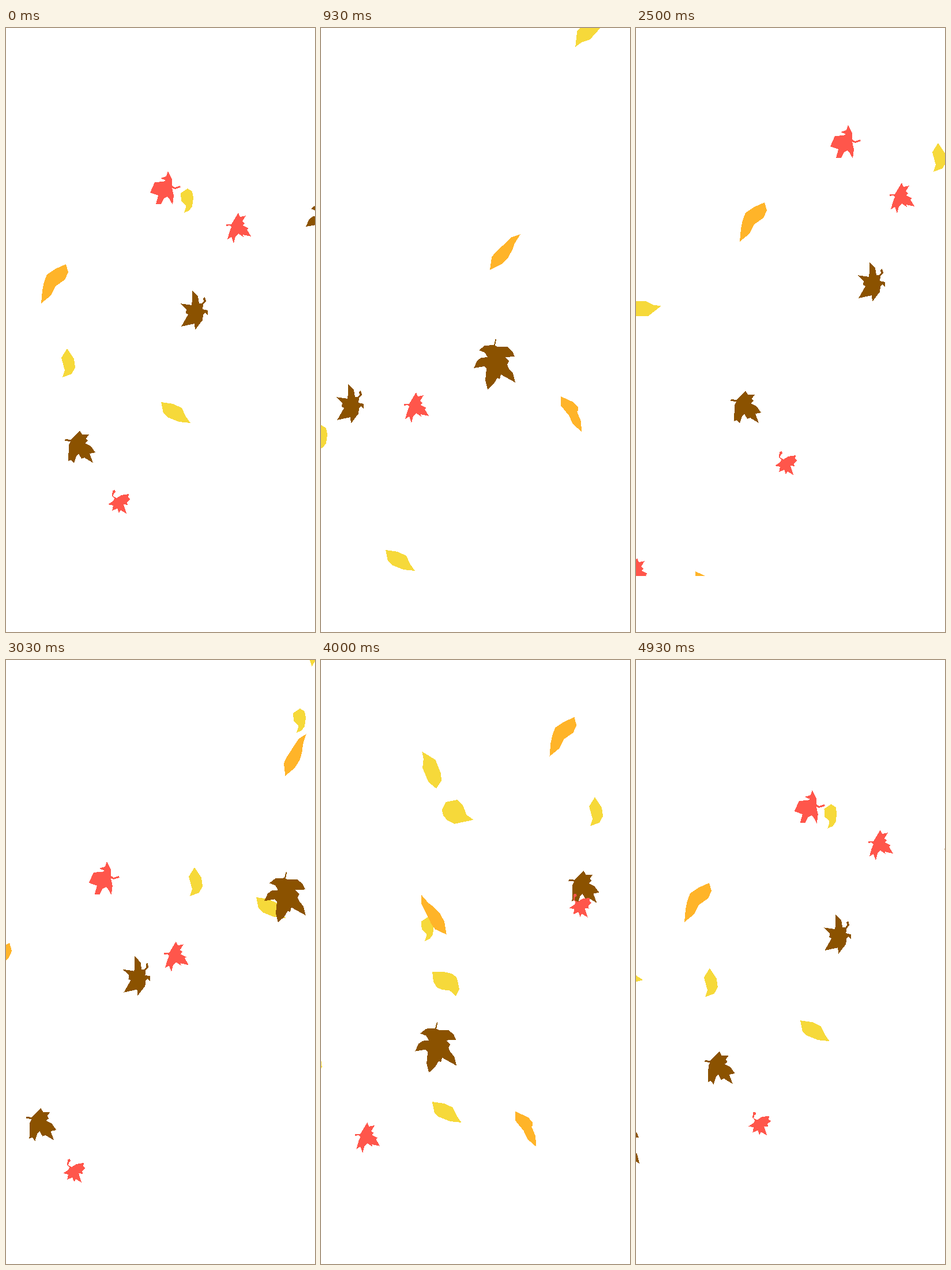
Recreate the animation shown at these times as an HTML page. Size 536 by 1046 pixels, loop 5010 ms.

```html
<!DOCTYPE html>
<html lang="en">
<head>
<meta charset="utf-8">
<title>Falling leaves</title>
<style>
html, body { margin: 0; width: 100%; height: 100%; overflow: hidden; background: #fff; }
svg { display: block; shape-rendering: crispEdges; }
</style>
</head>
<body>
<svg id="sky" width="536" height="949"></svg>
<script>
const LOOP = 5010, STEPS = 150;
const YELLOW = '#f6d93a', ORANGE = '#ffb429', BROWN = '#8b5200', RED = '#ff564b';

// Each leaf: colour, outline, anchor on the outline, then its flights.
// flight(knots [step, x, y], start delays, degrees per step, step with no turn)
const flight = (knots, delays = [0], spin = 0, upright = 0) => ({ knots, delays, spin, upright });

const leaves = [
  { fill: YELLOW, at: [325, 278],
    d: '315,278 323,283 325,294 323,309 318,316 309,320 312,311 312,307 304,300 303,286',
    flights: [flight([[-18, 520, 84], [-3, 360, 236], [0, 325, 278], [23, 62, 623], [28, 11, 688]], [0, 109])] },
  { fill: YELLOW, at: [146, 567],
    d: '146,567 167,567 180,570 188,576 190,583 193,597 187,609 176,599 164,598 154,594 148,584',
    flights: [flight([[106, 428, 399], [123, 146, 567], [132, 12, 640]], [0, 82])] },
  { fill: YELLOW, at: [269, 648],
    d: '269,648 290,651 305,658 312,673 320,684 300,682 280,674 273,667',
    flights: [flight([[-18, 434, 411], [-3, 293, 612], [0, 269, 648], [23, 131, 868], [28, 112, 904]], [0, 109])] },
  { fill: YELLOW, at: [106, 555],
    d: '106,555 118,573 120,588 114,599 98,605 102,593 96,571',
    flights: [flight([[116, 524, 199], [132, 327, 359], [147, 139, 523], [150, 106, 555]], [0, 109])] },
  { fill: YELLOW, at: [160.5, 224],
    d: '155,190 175,209 179,233 178,246 166,258 155,244 150,218 155,203',
    flights: [flight([[96, 465, 8], [106, 326, 74], [123, 161, 224], [132, 83, 346], [143, 9, 482]], [0, 82], 4.8, 122.5)] },
  { fill: YELLOW, at: [187, 303],
    d: '176,283 197,283 204,294 207,312 217,323 183,323 172,314 167,304 167,295',
    flights: [flight([[106, 409, 69], [123, 187, 303], [132, 42, 417]], [0, 82], 4.8, 122.5)] },
  { fill: ORANGE, at: [104, 409],
    d: '104,409 108,423 102,436 86,447 78,463 61,477 63,454 66,440 71,427 86,417',
    flights: [flight([[106, 542, 23], [132, 323, 200], [148, 127, 386], [150, 104, 409]]),
              flight([[55, 476, 85], [65, 354, 189], [75, 223, 302]])] },
  { fill: ORANGE, at: [416, 638],
    d: '416,638 438,648 446,657 446,662 444,664 451,681 452,699 437,686 430,671 416,654',
    flights: [flight([[28, 416, 638], [55, 212, 858], [75, 103, 941]]),
              flight([[106, 454, 629], [119, 345, 772], [132, 250, 887]])] },
  { fill: ORANGE, at: [319.5, 388],
    d: '346,357 336,373 332,384 325,397 313,409 293,419 296,397 303,388 315,377 331,362',
    flights: [flight([[28, 319.5, 388], [55, 68.5, 646.5]], [0], -2.04, 28),
              flight([[106, 344, 307.5], [132, 69, 555.5]], [0], -2.04, 84.2)] },
  { fill: BROWN, at: [323, 454],
    d: '323,454 333,465 335,477 340,477 343,473 342,468 345,466 347,473 342,479 341,487 350,489 350,498 345,493 342,496 341,506 334,515 328,523 327,512 304,517 316,496 312,494 313,487 302,477 322,480 323,470',
    flights: [flight([[-18, 526, 333], [-7, 405, 405], [0, 323, 454], [24, 79, 597], [28, 47, 616]], [0, 82])] },
  { fill: BROWN, at: [303, 538],
    d: '303,538 304,540 302,550 306,552 323,552 332,560 336,569 319,570 326,577 323,583 326,590 333,598 337,614 312,600 310,608 306,606 300,616 289,626 285,610 287,590 283,586 265,589 271,576 278,571 289,570 284,562 274,558 284,550 300,549 302,541',
    flights: [flight([[0, 558, 293], [24, 345, 500], [28, 303, 538], [50, 91, 715], [55, 51, 744], [66, -28, 796]], [0, 82])] },
  { fill: BROWN, at: [128, 697],
    d: '128,697 132,704 144,704 139,711 142,715 137,719 147,724 155,735 145,737 151,753 136,744 131,746 126,737 122,741 118,754 113,748 108,750 109,722 112,716 102,715 103,712 112,713',
    flights: [flight([[123, 420, 399], [132, 315, 502], [143, 190, 628], [150, 128, 697], [174, -22, 883]], [0, 82])] },
  { fill: RED, at: [281, 248],
    d: '281,248 288,262 288,273 293,276 302,273 303,276 293,279 288,277 291,290 289,306 284,297 280,292 274,295 269,305 260,305 264,290 250,285 258,267 273,266 277,264 268,260 278,257',
    flights: [flight([[132, 493, 57], [143, 368, 168], [150, 281, 248], [174, 12, 512]], [0, 82])] },
  { fill: RED, at: [403, 320],
    d: '403,320 406,327 416,325 410,335 414,338 411,342 421,347 418,349 425,361 411,358 412,362 403,356 398,361 395,373 391,362 384,366 388,352 391,345 388,342 382,343 382,340 391,340',
    flights: [flight([[0, 403, 320], [28, 165, 631], [55, 39, 833], [75, 2, 918]]),
              flight([[75, 461, 268], [106, 170, 663], [132, 24, 899]])] },
  { fill: RED, at: [177, 801],
    d: '185,801 189,800 190,804 187,806 186,811 192,814 200,809 213,807 212,813 216,816 210,821 211,826 204,825 209,841 199,835 196,840 193,832 184,836 186,827 177,825 186,819 188,815 184,810',
    flights: [flight([[123, 408, 455], [132, 337, 593], [143, 241, 734], [150, 177, 801], [174, -20, 916]], [0, 82])] },
];

// Smooth curve through the knots on one axis, straight beyond both ends.
function curve(knots, axis) {
  const n = knots.length - 1;
  const t = knots.map(k => k[0]), v = knots.map(k => k[axis]);
  const gap = i => t[i + 1] - t[i];
  const rate = i => (v[i + 1] - v[i]) / gap(i);
  const m = [];
  for (let i = 1; i < n; i++)
    m[i] = (rate(i - 1) * gap(i) + rate(i) * gap(i - 1)) / (gap(i - 1) + gap(i));
  m[0] = n > 1 ? 2 * rate(0) - m[1] : rate(0);
  m[n] = n > 1 ? 2 * rate(n - 1) - m[n - 1] : rate(0);
  return p => {
    if (p <= t[0]) return v[0] + m[0] * (p - t[0]);
    if (p >= t[n]) return v[n] + m[n] * (p - t[n]);
    let i = 0;
    while (p > t[i + 1]) i++;
    const h = gap(i), s = (p - t[i]) / h, r = 1 - s;
    return r * r * ((1 + 2 * s) * v[i] + s * h * m[i])
         + s * s * ((1 + 2 * r) * v[i + 1] - r * h * m[i + 1]);
  };
}

const sky = document.getElementById('sky');
const sprites = [];
for (const leaf of leaves)
  for (const { knots, delays, spin, upright } of leaf.flights)
    for (const delay of delays) {
      const el = document.createElementNS('http://www.w3.org/2000/svg', 'polygon');
      el.setAttribute('points', leaf.d);
      el.setAttribute('fill', leaf.fill);
      sky.append(el);
      sprites.push({
        el, delay, spin, upright, at: leaf.at,
        x: curve(knots, 1), y: curve(knots, 2),
        from: knots[0][0] - 30, to: knots[knots.length - 1][0] + 30,
      });
    }

const wrap = n => ((n % STEPS) + STEPS) % STEPS;

function draw(step) {
  for (const s of sprites) {
    const p = s.from + wrap(step - s.delay - s.from);
    s.el.style.display = p < s.to ? '' : 'none';
    s.el.setAttribute('transform',
      `translate(${s.x(p)} ${s.y(p)}) rotate(${s.spin * (p - s.upright)}) translate(${-s.at[0]} ${-s.at[1]})`);
  }
}

// Two of every three steps are shown: the first for 30 ms, the second for 70 ms.
const begin = performance.now();
function tick() {
  const t = (performance.now() - begin) % LOOP;
  draw(Math.min(148, 3 * Math.floor(t / 100) + (t % 100 >= 30 ? 1 : 0)));
  requestAnimationFrame(tick);
}
tick();
</script>
</body>
</html>
```
